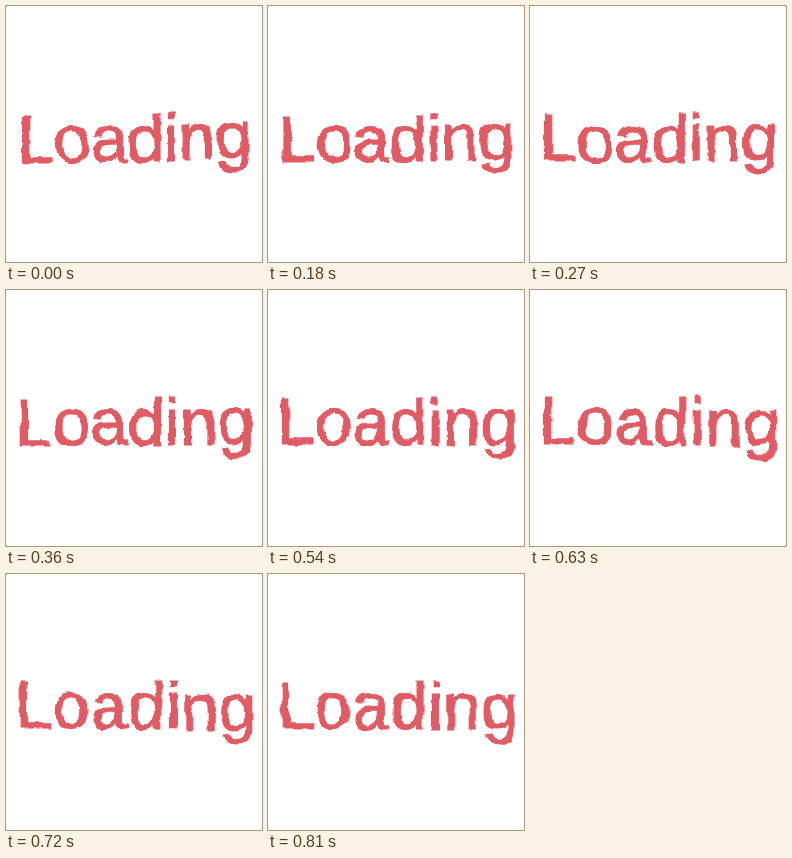
Recreate the animation shown at these times as an HTML page. Size 256x256 px, loop 0.9 s.

```html
<!DOCTYPE html>
<html lang="en">
<head>
<meta charset="utf-8">
<title>Loading</title>
<style>
  html, body { margin: 0; width: 100%; height: 100%; overflow: hidden; background: #fff; }
  svg { display: block; width: 100%; height: 100%; }
  text { font: 67px "Liberation Sans", Arial, sans-serif; fill: #e15b64; stroke: #e15b64; stroke-width: 1.2; }
</style>
</head>
<body>
<svg viewBox="0 0 256 256">
  <defs>
    <filter id="rough" filterUnits="userSpaceOnUse" x="0" y="80" width="256" height="110" color-interpolation-filters="sRGB">
      <feTurbulence id="noise" type="fractalNoise" baseFrequency=".05" numOctaves="3" result="n"/>
      <feDisplacementMap in="SourceGraphic" in2="n" scale="6" xChannelSelector="R" yChannelSelector="G"/>
    </filter>
  </defs>
  <g filter="url(#rough)"><text id="word">Loading</text></g>
</svg>
<script>
const STEP = 90, LOOP = 900, LAST = LOOP / STEP - 1;
const word = document.getElementById('word');
const noise = document.getElementById('noise');
const letters = [...word.textContent];
const lerp = (a, b, t) => a + (b - a) * t;

// Resting pen position of each letter
word.setAttribute('x', 9.5);
const home = letters.map((_, i) => word.getStartPositionOfChar(i).x);

let shown = -1;
function draw(ms) {
  // The first pose is held for two steps
  const step = Math.max(1, Math.floor((ms % LOOP) / STEP));
  if (step === shown) return;
  shown = step;

  // Over the loop the word widens and its raised right end settles
  const p = Math.sin((step - 1) / (LAST - 1) * Math.PI / 2);
  const along = letters.map((_, i) => i / (letters.length - 1));
  const x = along.map((u, i) => home[i] + lerp(lerp(1.5, -1.5, u), lerp(-.8, 2.5, u), p));
  const y = along.map(u => 155 + lerp(lerp(1.5, -3, u ** 3), lerp(-1.2, 1, u), p));
  word.setAttribute('x', x.join(' '));
  word.setAttribute('y', y.join(' '));
  noise.setAttribute('seed', step);
}

const start = performance.now();
function tick() {
  draw(performance.now() - start);
  requestAnimationFrame(tick);
}
tick();
</script>
</body>
</html>
```
